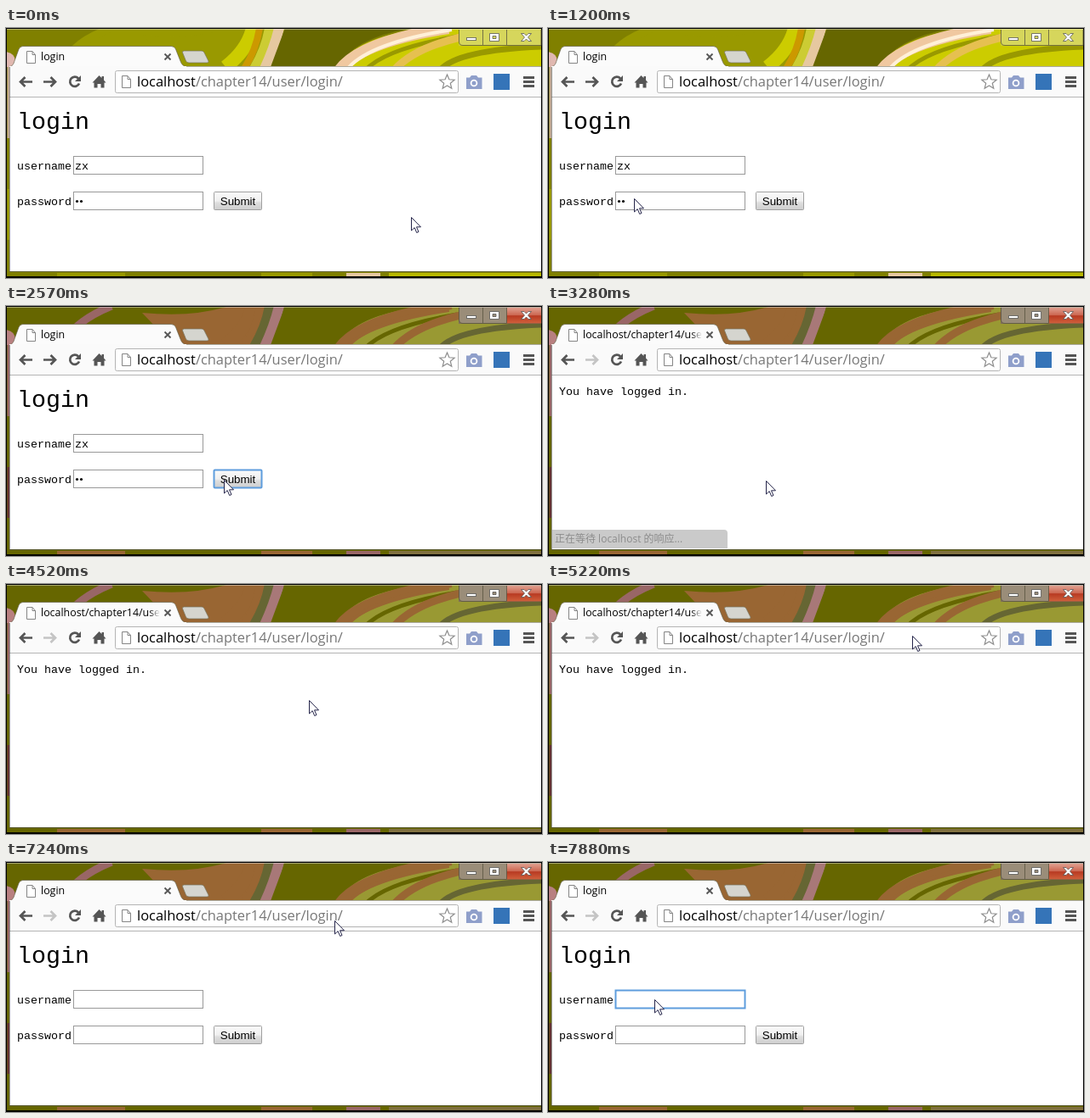
Write an HTML page that moves like this. It is 630 px wide and 295 px high and loops after 8000 ms.

```html
<!DOCTYPE html>
<html lang="en">
<head>
<meta charset="utf-8">
<title>Login page</title>
<style>
html, body { margin: 0; width: 100%; height: 100%; overflow: hidden; background: #000; }
svg { display: block; width: 630px; height: 295px; }
text { white-space: pre; }
.ui { font: 12px "Open Sans", "Noto Sans CJK SC", "Noto Sans CJK", sans-serif; }
.title { font-size: 12.4px; }
.url { font: 16.45px "Open Sans", sans-serif; }
.page { font: 13.33px "Liberation Mono", monospace; }
.head { font: 28.33px "Liberation Mono", monospace; }
.button { font: 13.33px "Liberation Sans", sans-serif; }
.line { fill: none; stroke: #555; stroke-width: 2.7; }
.field { fill: #fff; stroke: #999; }
.focus { stroke: #5e9ddd; stroke-width: 2; }
.off { display: none; }
</style>
</head>
<body>
<svg viewBox="0 0 630 295">
  <defs>
    <linearGradient id="btn" x2="0" y2="1">
      <stop stop-color="#fafafa"/><stop offset=".5" stop-color="#f0f0f0"/>
      <stop offset=".6" stop-color="#dedede"/><stop offset="1" stop-color="#cecece"/>
    </linearGradient>
    <linearGradient id="red" x2="0" y2="1">
      <stop stop-color="#e0a090"/><stop offset=".48" stop-color="#cc6650"/>
      <stop offset=".52" stop-color="#b83a22"/><stop offset="1" stop-color="#d0603c"/>
    </linearGradient>
    <linearGradient id="fade">
      <stop stop-color="#fbfbfb" stop-opacity="0"/><stop offset="1" stop-color="#fbfbfb"/>
    </linearGradient>
    <clipPath id="inside"><rect x="1" y="1" width="628" height="292"/></clipPath>
    <g id="sheet">
      <path d="M.5 .5H7L10.5 4.5V14.5H.5Z" fill="#fff" stroke="#858585"/>
      <path d="M7 .5V4.5H10.5" fill="none" stroke="#858585"/>
    </g>
  </defs>

  <rect width="630" height="295"/>
  <g clip-path="url(#inside)">
    <g id="idleGlass"></g>
    <g id="liveGlass"></g>
    <path d="M1 1.5H629" stroke="#fff" stroke-opacity=".45"/>
  </g>

  <!-- window buttons -->
  <g stroke-opacity=".75">
    <path d="M532.5 2V16Q532.5 20.5 537 20.5H629V2" fill="#fff" fill-opacity=".2" stroke="#54503c"/>
    <path id="close" d="M588.5 2H629V20.5H588.5Z" fill="url(#red)"/>
    <path d="M560.5 2V20M588.5 2V20" stroke="#54503c"/>
    <g fill="#fff" stroke="#505050">
      <rect x="541.5" y="11.5" width="11" height="3"/>
      <path d="M568.5 6.5H579.5V15.5H568.5ZM572 9.5V12.5H576V9.5Z" fill-rule="evenodd"/>
      <path d="M605.5 6.5H609L611.5 9L614 6.5H617.5L613.5 11L617.5 15.5H614L611.5 13L609 15.5H605.5L609.5 11Z"/>
    </g>
  </g>

  <!-- tab strip -->
  <path d="M207.5 29Q207 27 209.5 27H230Q232 27 233 29L238 39Q238.5 41 236 41H215Q212.5 41 211.5 39Z" fill="#d5d5cf" stroke="#77745f" stroke-opacity=".7"/>
  <path d="M4 45.5C9 45 9 41 11 36L15 25Q16.5 21.5 20 21.5H194Q198 21.5 199.5 25L205 39Q207 45 212 45.5Z" fill="#fbfbfb" stroke="#66624a" stroke-opacity=".7"/>
  <use id="tabIcon" href="#sheet" x="24" y="27"/>
  <path id="spinner" d="M29.5 28.5A5.5 5.5 0 1 1 24 34" fill="none" stroke="#6b8fc4" stroke-width="2"/>
  <text id="tabTitle" class="ui title" x="41" y="38">login</text>
  <rect x="168" y="24" width="13" height="19" fill="url(#fade)"/>
  <path d="M186.5 30.5L193.5 37.5M193.5 30.5L186.5 37.5" stroke="#555" stroke-width="1.8"/>

  <!-- toolbar -->
  <rect x="4" y="45" width="625" height="37" fill="#fafafa"/>
  <path d="M212 45.5H629" stroke="#77745f" stroke-opacity=".6"/>
  <path d="M4 81.5H629" stroke="#b5b5b5"/>
  <path class="line" d="M31 63.5H18M22.5 58L17 63.5L22.5 69"/>
  <path id="forward" class="line" d="M44 63.5H57M52.5 58L58 63.5L52.5 69"/>
  <path class="line" d="M85 59.5A5.6 5.6 0 1 0 86 65.5"/>
  <path d="M88 56V63H81Z" fill="#555"/>
  <path d="M101.500 64.500L109.500 56L112.500 59V57H115V61.500L117.500 64.500H115.500V70.500H111.500V66H107.500V70.500H103.500V64.500Z" fill="#555"/>
  <rect x="128.5" y="50.5" width="403" height="26" rx="2" fill="#fff" stroke="#b4b4b4"/>
  <use href="#sheet" x="136" y="56"/>
  <rect id="selection" x="154" y="53" width="243" height="20" fill="#3399ff"/>
  <text id="url" class="url" x="154" y="69"><tspan id="host">localhost</tspan>/chapter14/user/login/</text>
  <path id="star" fill="#fff" stroke="#8d8d8d" stroke-width="1.2"/>
  <path d="M541 58.5H545L547 56H553L555 58.5H559.5V72H541Z" fill="#8f9fca"/>
  <circle cx="550" cy="65" r="4.3" fill="#fff"/><circle cx="550" cy="65" r="2.5" fill="#8f9fca"/>
  <rect x="573" y="54" width="19" height="19" fill="#3574b8"/>
  <path d="M608 58.5H621M608 63.5H621M608 68.5H621" stroke="#555" stroke-width="3"/>

  <!-- page -->
  <rect x="4" y="82" width="625" height="205" fill="#fff"/>
  <path d="M4.5 46V287.5H629" fill="none" stroke="#555" stroke-opacity=".6"/>
  <g id="form">
    <text class="head" x="13" y="119">login</text>
    <text class="page" x="13" y="167">username</text>
    <text class="page" x="13" y="209">password</text>
    <rect id="userField" class="field" x="79.5" y="151.5" width="152" height="21"/>
    <rect id="passField" class="field" x="79.5" y="193.5" width="152" height="21"/>
    <g id="filled">
      <text class="page" x="81" y="167">zx</text>
      <circle cx="83.5" cy="204.5" r="1.6"/><circle cx="88.5" cy="204.5" r="1.6"/>
    </g>
    <path id="caret" d="M91.5 196V212" stroke="#000"/>
    <rect id="submit" x="244.5" y="193.5" width="56" height="21" rx="1" fill="url(#btn)" stroke="#a0a0a0"/>
    <text class="button" x="272.5" y="209" text-anchor="middle">Submit</text>
  </g>
  <text id="welcome" class="page" x="13" y="105">You have logged in.</text>
  <g id="status">
    <path d="M5 264H207Q211 264 211 268V286H5Z" fill="#cacaca"/>
    <text class="ui" x="8" y="279" fill="#8c8c8c">正在等待 localhost 的响应...</text>
  </g>

  <path id="cursor" d="M.5 .5V16L4.2 12.6L6.7 18.5L9 17.5L6.5 11.8H11.5Z" fill="#fff" stroke="#25254a"/>
</svg>
<script>
const LOOP = 8000;
const $ = id => document.getElementById(id);
const show = (id, on) => $(id).classList.toggle("off", !on);
const within = (t, a, b) => t >= a && t < b;

// path, stroke width (0 = filled), idle colour, active colour
const glass = [
  ["M0 0H630V295H0Z", 0, "#808000", "#666600"],
  ["M62 46Q72 16 112 0H330L290 46Z", 0, "#999900", "#666600"],
  ["M66 46Q80 18 124 0", 9, "#999900", "#996666"],
  ["M196 46L160 8Q220 14 262 0H312L290 46Z", 0, "#999900", "#996633"],
  ["M258 46Q284 26 290 0", 16, "#cccc00", "#996633"],
  ["M280 48Q294 26 298 0", 8, "#cc9900", "#996633"],
  ["M292 48Q306 24 310 0", 12, "#cccc33", "#666633"],
  ["M304 48Q316 22 321 0", 12, "#e6c8a0", "#a87878"],
  ["M311 46L328 0H480Q410 10 390 46Z", 0, "#666600", "#666600"],
  ["M390 46Q412 8 500 0H630V46Z", 0, "#cccc00", "#999933"],
  ["M392 50Q416 16 520 0", 14, "#f0c8a0", "#996633"],
  ["M400 50Q424 18 524 2", 4, "#fff0d8", "#996633"],
  ["M422 50Q446 24 530 10", 5, "#999900", "#666600"],
  ["M456 50Q484 18 560 6", 9, "#e6c050", "#996633"],
  ["M510 50Q530 26 630 22", 7, "#999900", "#666633"],
  ["M532 0H630V21H532Z", 0, "#cccc33", "#807058"],
  ["M0 28Q14 30 10 46H0Z", 0, "#e0b8b0", "#b88080"],
  ["M3 46V130", 3, "#c0a890", "#996666"],
  ["M3 190V250", 3, "#999900", "#663333"],
  ["M60 291H140M300 291H360", 4, "#999900", "#996633"],
  ["M400 291H440", 4, "#e6c8a0", "#996666"],
  ["M450 291H630", 4, "#b8b800", "#807040"]
];

function paintGlass(id, col) {
  $(id).innerHTML = glass.map(shape => {
    const [d, width] = shape, color = shape[col];
    return width
      ? `<path d="${d}" fill="none" stroke="${color}" stroke-width="${width}"/>`
      : `<path d="${d}" fill="${color}"/>`;
  }).join("");
}
paintGlass("idleGlass", 2);
paintGlass("liveGlass", 3);

let star = "";
for (let i = 0; i < 10; i++) {
  const r = i % 2 ? 4 : 9, a = i * Math.PI / 5;
  star += (i ? "L" : "M") + (518.5 + r * Math.sin(a)).toFixed(1) + " " + (64 - r * Math.cos(a)).toFixed(1);
}
$("star").setAttribute("d", star + "Z");

// first step, last step, number of steps, x, y
const moves = [
  [0, 0, 1, 476, 223],
  [100, 100, 1, 472, 221],
  [520, 1200, 13, 101, 201],
  [1450, 1450, 1, 102, 200],
  [1930, 2550, 11, 256, 205],
  [2760, 2760, 1, 256, 206],
  [3530, 3680, 4, 274, 181],
  [4240, 4350, 3, 295, 144],
  [4520, 4520, 1, 356, 137],
  [4577, 4920, 7, 424, 52],
  [5060, 5230, 3, 429, 64],
  [6230, 6310, 2, 397, 64],
  [7200, 7630, 8, 138, 178],
  [7690, 7820, 3, 125, 162]
];

function cursorAt(t) {
  let x = 0, y = 0;
  for (const [from, to, steps, endX, endY] of moves) {
    if (t < from) break;
    const k = t >= to ? steps : Math.floor((t - from) / (to - from) * (steps - 1)) + 1;
    const p = k / steps, e = p * p * (3 - 2 * p);
    x += (endX - x) * e;
    y += (endY - y) * e;
  }
  return [Math.round(x), Math.round(y)];
}

function statusAlpha(t) {
  if (t < 2760 || t >= 3680) return 0;
  if (t < 2930) return (Math.floor((t - 2760) / 57) + 1) / 3;
  return t < 3530 ? 1 : .75 - Math.floor((t - 3530) / 50) * .25;
}

function draw(t) {
  const live = t >= 1240;
  const welcome = within(t, 3100, 6170);
  const loading = within(t, 2610, 3280) || within(t, 5540, 6170);
  const selected = within(t, 5290, 5540);

  show("idleGlass", !live);
  show("liveGlass", live);
  show("close", live);
  show("form", !welcome);
  show("welcome", welcome);
  show("filled", t < 3100);
  show("caret", within(t, 1240, 1790) || within(t, 2320, 2550));
  $("passField").classList.toggle("focus", within(t, 1240, 2550));
  $("userField").classList.toggle("focus", t >= 7880);
  $("submit").classList.toggle("focus", within(t, 2550, 3100));

  $("tabTitle").textContent = welcome ? "localhost/chapter14/use" : "login";
  $("forward").style.stroke = t < 3100 ? "#555" : "#c4c4c4";
  show("tabIcon", !loading);
  show("spinner", loading);
  const turn = -30 * Math.floor(Math.max(0, Math.min(t, 3280) - 2760) / 57);
  $("spinner").setAttribute("transform", `rotate(${turn} 29.5 34)`);

  show("selection", selected);
  $("url").style.fill = selected ? "#fff" : "#777";
  $("host").style.fill = selected ? "#fff" : "#000";
  $("status").style.opacity = statusAlpha(t);
  $("cursor").setAttribute("transform", `translate(${cursorAt(t)})`);
}

const start = performance.now();
function tick() {
  draw((performance.now() - start) % LOOP);
  requestAnimationFrame(tick);
}
tick();
</script>
</body>
</html>
```
